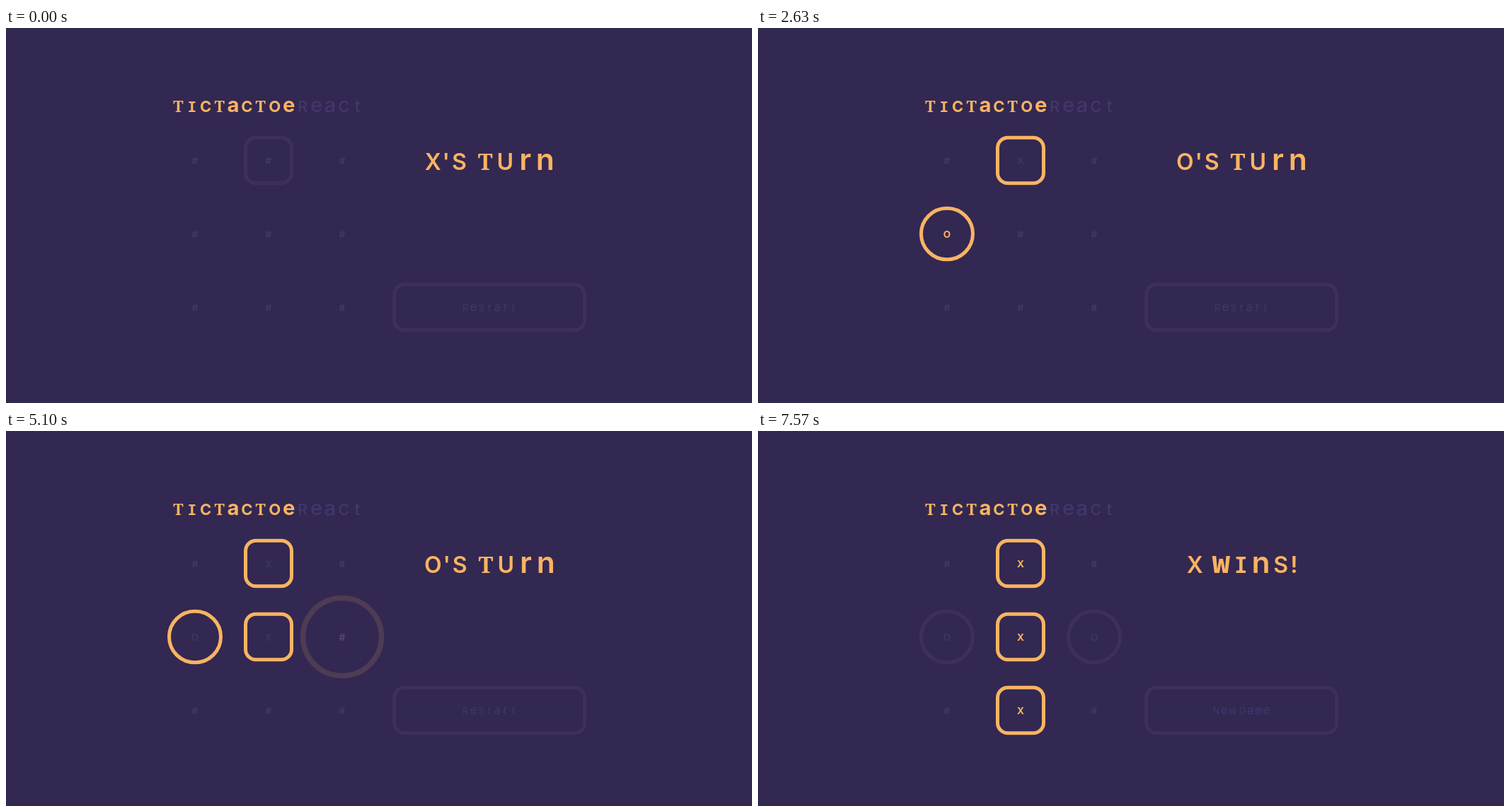
An HTML page with a canvas that plays this animation: 1054 by 531 pixels, repeating every 8 s.

```html
<!DOCTYPE html>
<html lang="en">
<head>
<meta charset="utf-8">
<title>Tic-tac-toe</title>
<style>
  html, body { margin: 0; width: 100%; height: 100%; overflow: hidden; background: #30302f; }
  canvas { display: block; }
</style>
</head>
<body>
<canvas id="stage" width="1054" height="531"></canvas>
<script>
const ctx = document.getElementById('stage').getContext('2d');
const LOOP = 8000, STEP = 100 / 3;
const BG = [51, 40, 82], AMBER = [249, 180, 98], LINE = [61, 48, 95], INK = [67, 54, 107];
const WIN_AT = 7266;

// Pointer enters a cell at `hover`, presses it at `click`.
const moves = [
  { cell: 1, mark: 'X', hover: 367, click: 933 },
  { cell: 3, mark: 'O', hover: 2067, click: 2633 },
  { cell: 4, mark: 'X', hover: 3569, click: 4200 },
  { cell: 5, mark: 'O', hover: 5069, click: 5700 },
  { cell: 7, mark: 'X', hover: 6713, click: WIN_AT }
];

const clamp = v => Math.min(1, Math.max(0, v));
const rgb = c => `rgb(${c.map(Math.round)})`;
const mix = (a, b, p) => a.map((v, i) => v + (b[i] - v) * p);

// Same curve as the CSS "ease" keyword.
function ease(x) {
  if (x <= 0 || x >= 1) return clamp(x);
  let lo = 0, hi = 1, s = 0.5;
  const bez = (a, b) => 3 * (1 - s) ** 2 * s * a + 3 * (1 - s) * s * s * b + s ** 3;
  for (let i = 0; i < 20; i++) {
    if (bez(0.25, 0.25) < x) lo = s; else hi = s;
    s = (lo + hi) / 2;
  }
  return bez(0.1, 1);
}

const progress = (t, start, length) => ease((t - start) / length);

// Unicase lettering: lowercase forms grow to cap height on a nearly fixed pitch.
function advance(ch) {
  if (ch === "'" || ch === '!') return 0.28;
  if (ch === ' ') return 0.27;
  return ch === 'O' ? 0.935 : 0.881;
}

function glyphFont(ch, size, weight) {
  const grow = 'aernmw'.includes(ch) ? 1.33 : ch === 't' ? 1.08 : 1;
  const family = ch === 'T' ? '"Noto Serif", serif'
    : 'Iwm'.includes(ch) ? '"Noto Sans Mono", monospace'
    : 'Inter, sans-serif';
  return `${weight} ${size * grow}px ${family}`;
}

const textWidth = (text, size) => [...text].reduce((w, ch) => w + advance(ch) * size, 0);

function lettering(text, x, cy, size, weight, color) {
  ctx.fillStyle = rgb(color);
  ctx.textAlign = 'center';
  for (const ch of text) {
    const w = advance(ch) * size;
    ctx.font = glyphFont(ch, size, weight);
    ctx.fillText(ch, x + w / 2, cy + size * 0.364);
    x += w;
  }
  return x;
}

function centered(text, cx, cy, size, weight, color) {
  lettering(text, cx - textWidth(text, size) / 2, cy, size, weight, color);
}

function zoomed(cx, cy, scale, alpha, draw) {
  ctx.save();
  ctx.translate(cx, cy);
  ctx.scale(scale, scale);
  ctx.globalAlpha = alpha;
  draw();
  ctx.restore();
}

// Outline with a 5px border, given by its outer size.
function frame(w, h, radius, color) {
  ctx.strokeStyle = rgb(color);
  ctx.lineWidth = 5;
  ctx.beginPath();
  ctx.roundRect(-w / 2 + 2.5, -h / 2 + 2.5, w - 5, h - 5, radius - 2.5);
  ctx.stroke();
}

function drawCell(index, t) {
  const cx = 267 + 104 * (index % 3);
  const cy = 187.5 + 104 * Math.floor(index / 3);
  const move = moves.find(m => m.cell === index);
  const win = progress(t, WIN_AT, 300);
  let symbol = '#', glow = 0, weight = 700;

  if (move && t >= move.hover) {
    const enter = progress(t, move.hover, 250);
    const isX = move.mark === 'X';
    const color = isX ? AMBER : mix(AMBER, LINE, win);
    zoomed(cx, cy, 1.6 - 0.6 * enter, enter, () =>
      isX ? frame(70, 69.5, 17, color) : frame(78, 77.5, 38.75, color));
    glow = enter;
    if (t >= move.click - 1) {
      symbol = move.mark;
      const fade = 1 - progress(t, move.click, 300);
      glow = isX && t >= WIN_AT ? Math.max(fade, win) : fade;
      weight = glow > 0.5 ? 700 : 500;
    }
  } else if (index === 1) {
    zoomed(cx, cy, 1, 1, () => frame(70, 69.5, 17, LINE));
  }
  centered(symbol, cx, cy + 0.5, 13.5, weight, mix(INK, AMBER, glow));
}

function drawStatus(t) {
  const last = moves.filter(m => t >= m.click + 20).pop();
  let text = "X'S TUrn", enter = 1;
  if (last) {
    enter = progress(t, last.click, 300);
    if (last.click === WIN_AT) text = 'X wInS!';
    else if (last.mark === 'X') text = "O'S TUrn";
  }
  zoomed(682.5, 189.5, 1.4 - 0.4 * enter, enter, () => centered(text, 0, 0, 32, 600, AMBER));
}

function render(t) {
  ctx.clearRect(0, 0, 1054, 531);
  ctx.fillStyle = rgb(BG);
  ctx.beginPath();
  ctx.roundRect(0, 0, 1054, 531, 4);
  ctx.fill();

  const x = lettering('TICTaCTOe', 233.8, 110.8, 22, 700, AMBER);
  lettering('ReaCt', x, 110.8, 22, 500, INK);
  for (let i = 0; i < 9; i++) drawCell(i, t);
  drawStatus(t);

  zoomed(683, 395.5, 1, 1, () => frame(274, 69.5, 17, LINE));
  centered(t > WIN_AT + 20 ? 'New Game' : 'ReStart', 683, 396, 12.8, 400, INK);
}

function tick() {
  const t = performance.now() % LOOP;
  render(Math.floor((t + 3.5) / STEP) * STEP);
  requestAnimationFrame(tick);
}
tick();
</script>
</body>
</html>
```
